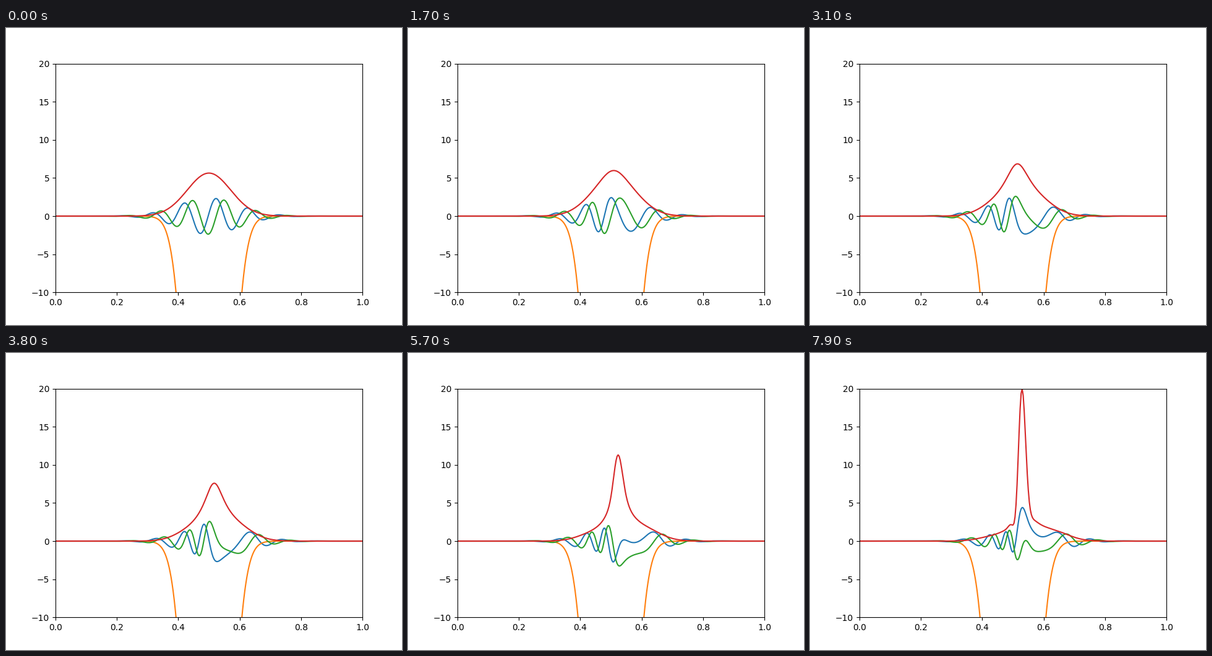
A matplotlib script for the animation above (8000 ms loop, 640 by 480 pixels).

```python
import numpy as np
import matplotlib.pyplot as plt
from matplotlib.animation import FuncAnimation

FRAMES = 80
INTERVAL = 100        # ms
STEPS = 100           # solver steps per frame
NX = 301
DT = 1e-7

x = np.linspace(0, 1, NX)
dx = x[1] - x[0]
well = -1e4 * np.exp(-(x - 0.5) ** 2 / (2 * 0.05 ** 2))


def normalise(psi):
    return psi / np.sqrt(np.sum(np.abs(psi) ** 2) * dx)


def step(psi):
    """One explicit Euler step of the Schrodinger equation, ends held fixed."""
    new = psi.copy()
    mid = psi[1:-1]
    bend = (psi[2:] - 2 * mid + psi[:-2]) / dx ** 2
    new[1:-1] += DT * (0.5j * bend - 1j * well[1:-1] * mid)
    return normalise(new)


def evolve():
    psi = normalise(np.exp(-(x - 0.5) ** 2 / (2 * 0.1 ** 2) + 60j * x))
    states = [psi]
    while len(states) < FRAMES:
        for _ in range(STEPS):
            psi = step(psi)
        states.append(psi)
    return states


states = evolve()

fig, ax = plt.subplots(figsize=(6.4, 4.8), dpi=100)
real, = ax.plot([], [], color="tab:blue")
ax.plot(x, well / 100, color="tab:orange")
imag, = ax.plot([], [], color="tab:green")
density, = ax.plot([], [], color="tab:red")
ax.set_xlim(0, 1)
ax.set_ylim(-10, 20)


def draw(frame):
    psi = states[frame]
    real.set_data(x, psi.real)
    imag.set_data(x, psi.imag)
    density.set_data(x, np.abs(psi) ** 2)
    return real, imag, density


anim = FuncAnimation(fig, draw, frames=FRAMES, interval=INTERVAL, repeat=True)
plt.show()
```
